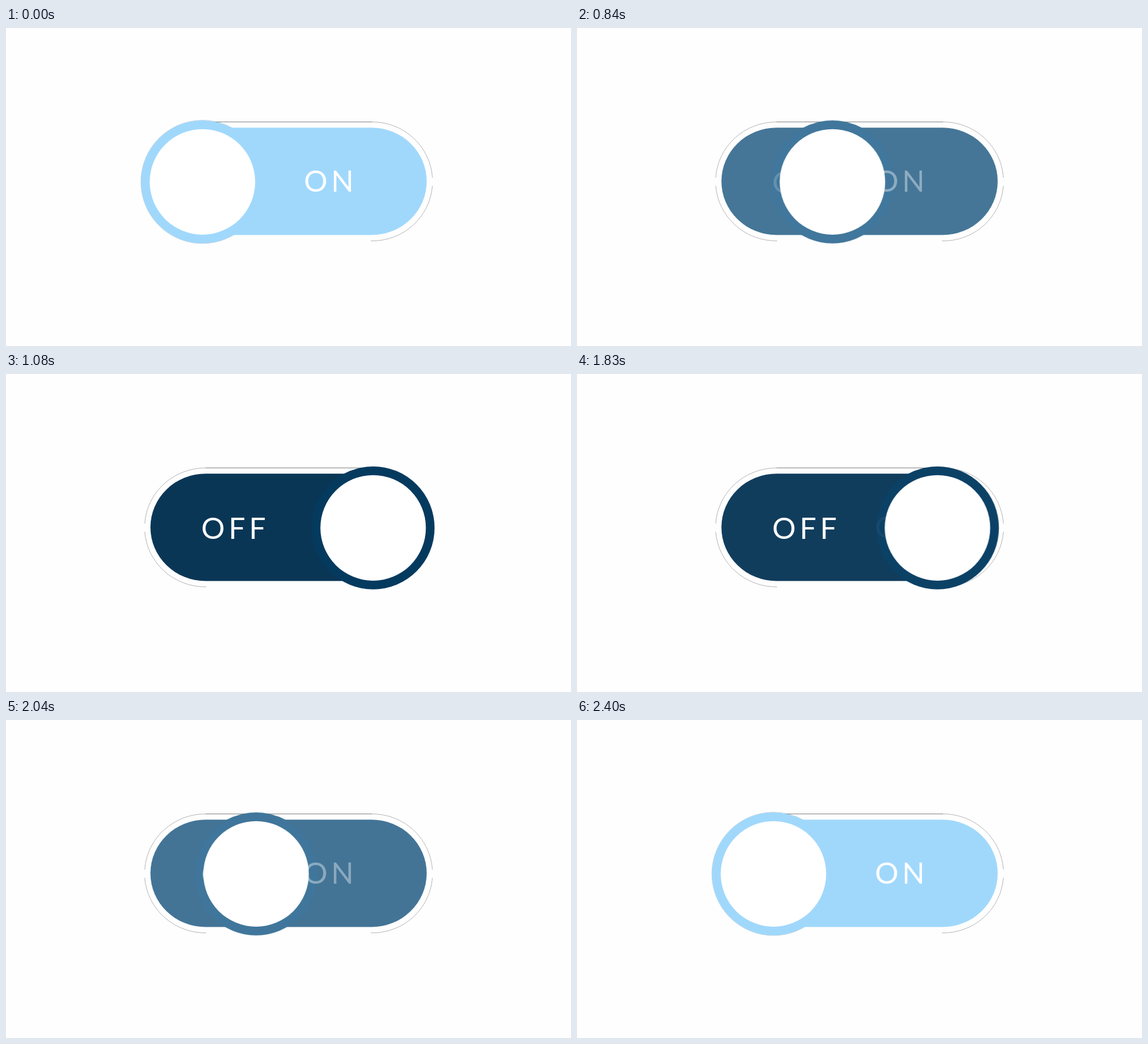
These frames come from a looping animation (960x540 px, 3.27 s). An HTML page:

```html
<!DOCTYPE html>
<html lang="en">
<head>
<meta charset="utf-8">
<title>Toggle switch</title>
<style>
  html, body { margin: 0; width: 100%; height: 100%; overflow: hidden; background: #fefefe; }
  svg { display: block; width: 960px; height: 540px; }

  /* The script drives --t in milliseconds; every animation is read at that time. */
  .anim {
    animation: 3270ms linear calc(var(--t, 0) * -1ms) infinite paused;
  }
  .slide { animation-name: slide; }
  .body { animation-name: body; }
  .ring { animation-name: ring; }
  .on { animation-name: on; }
  .off { animation-name: off; }
  .edge { animation-name: edge; }

  text {
    font: 400 50px Lato, sans-serif;
    letter-spacing: 6.4px;
    font-kerning: none;
    fill: #fff;
  }
  .line { fill: none; stroke: #777; stroke-width: .9; }
  .arc { fill: none; stroke: #444; stroke-width: .4; }

  @keyframes slide {
    0% { transform: translateX(0); }
    17.4312% { transform: translateX(0); animation-timing-function: cubic-bezier(.64, 0, .67, 1); }
    33.0275% { transform: translateX(290px); }
    55.0459% { transform: translateX(290px); animation-timing-function: cubic-bezier(.2, .08, .26, .99); }
    73.3945%, 100% { transform: translateX(0); }
  }
  @keyframes body {
    0% { fill: #a0d8fc; }
    17.4312% { fill: #a0d8fc; animation-timing-function: cubic-bezier(.33, .06, .6, 1); }
    33.0275% { fill: #0a3656; }
    55.0459% { fill: #0a3656; animation-timing-function: cubic-bezier(.4, .32, .8, .7); }
    71.5596%, 100% { fill: #a0d8fc; }
  }
  @keyframes ring {
    0% { fill: #a0d8fc; }
    17.4312% { fill: #a0d8fc; animation-timing-function: cubic-bezier(.33, .27, .6, .85); }
    33.0275% { fill: #053a5f; }
    55.0459% { fill: #053a5f; animation-timing-function: cubic-bezier(.4, .32, .8, .7); }
    71.5596%, 100% { fill: #a0d8fc; }
  }
  @keyframes on {
    0% { opacity: 1; }
    17.4312% { opacity: 1; animation-timing-function: cubic-bezier(.33, .06, .6, 1); }
    33.0275% { opacity: 0; }
    55.0459% { opacity: 0; animation-timing-function: cubic-bezier(.4, .32, .8, .7); }
    71.5596%, 100% { opacity: 1; }
  }
  @keyframes off {
    0% { opacity: 0; }
    17.4312% { opacity: 0; animation-timing-function: cubic-bezier(.6, 0, .9, .6); }
    33.0275%, 58.7156% { opacity: 1; }
    66.055%, 100% { opacity: 0; }
  }
  @keyframes edge {
    0%, 17.4312% { opacity: .6; }
    33.0275%, 55.0459% { opacity: 0; }
    73.3945%, 100% { opacity: .6; }
  }
</style>
</head>
<body>
<svg viewBox="0 0 960 540">
  <path class="line" d="M339 159.5H622"/>
  <path class="arc" d="M339 159.5A103.5 101 0 0 0 235.7 254M235.7 268A103.5 101 0 0 0 340 361.5"/>
  <path class="arc" d="M622 159.5A102.5 101 0 0 1 724.5 254M724.5 268A102.5 101 0 0 1 620 361.5"/>
  <g class="anim slide">
    <circle class="anim edge" cx="333.8" cy="261.3" r="104.6" fill="none" stroke="#4b7894" stroke-width=".6"/>
  </g>
  <rect class="anim body" x="245.4" y="169.2" width="469.4" height="182.3" rx="93.7" ry="91.15"/>
  <g class="anim slide">
    <circle class="anim ring" cx="333.8" cy="261.3" r="104.4"/>
  </g>
  <text class="anim on" x="506.2" y="278.3">ON</text>
  <text class="anim off" x="331.8" y="279.8">OFF</text>
  <g class="anim slide">
    <circle cx="333.8" cy="261.3" r="89.6" fill="#fff"/>
  </g>
</svg>
<script>
  const LOOP = 3270, STEP = 30;
  const root = document.documentElement;
  const start = performance.now();

  function draw() {
    const time = (performance.now() - start) % LOOP;
    root.style.setProperty('--t', Math.floor(time / STEP) * STEP);
    requestAnimationFrame(draw);
  }
  draw();
</script>
</body>
</html>
```
